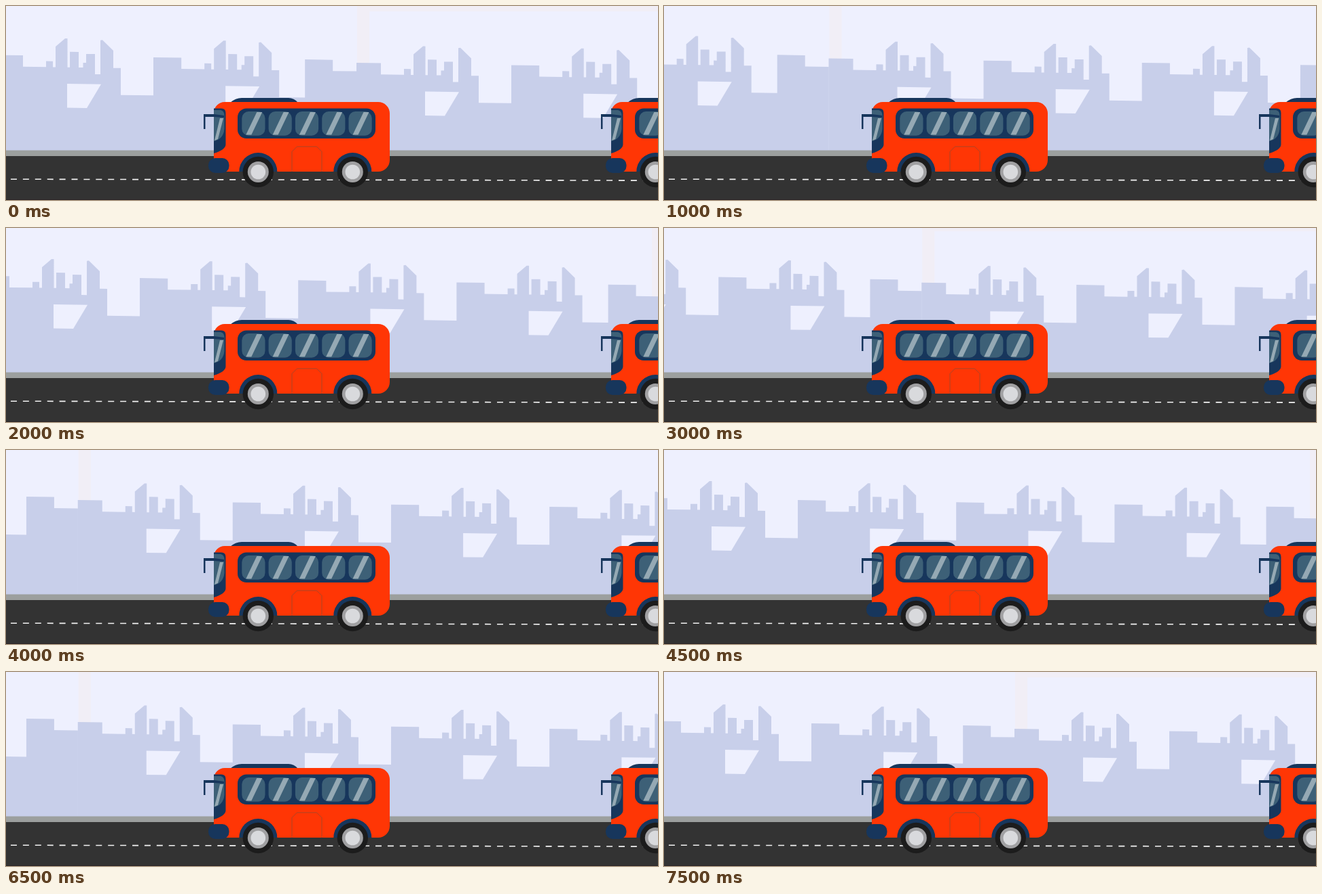
Write an HTML page with a canvas that moves like this. It is 960 px wide and 287 px high and loops after 8000 ms.

```html
<!DOCTYPE html>
<html lang="en">
<head>
<meta charset="utf-8">
<title>Bus in the city</title>
<style>
html, body { margin: 0; width: 100%; height: 100%; overflow: hidden; background: #eef0fe; }
canvas { display: block; }
</style>
</head>
<body>
<canvas id="stage" width="960" height="287"></canvas>
<script>
const ctx = document.getElementById('stage').getContext('2d');
const SKY = '#eef0fe', CITY = '#c8cfea', PINK = '#f1eef6';
const RED = '#ff3605', NAVY = '#17365c', GLASS = '#3d6077', GLARE = '#95a9b4';
const LOOP = 8000, HOLD = 500, POSES = 5;
const TILE = 233.2, SLOPE = 0.0139, BASE = -24.3, LOW = 15.6;

// Roofline of one block, relative to the top left corner of its opening.
const BLOCK = [
  [-65, BASE], [-31, BASE], [-31, -33], [-21, -33], [-21, BASE], [-17, BASE],
  [-17, -54.8], [-3, -67], [0.5, -67], [0.5, BASE], [4, BASE],
  [4, -47.2], [17, -47.2], [17, BASE], [23.5, BASE],
  [23.5, -31.3], [28, -31.3], [28, -44.5], [41, -44.5], [41, -14.6], [49, -14.6],
  [49, -65], [52, -65.5], [68, -50], [68, BASE], [79, BASE], [79, LOW]
];

function poly(points, color) {
  ctx.beginPath();
  points.forEach(([x, y]) => ctx.lineTo(x, y));
  ctx.closePath();
  ctx.fillStyle = color;
  ctx.fill();
}

function box(x, y, w, h, r, color) {
  ctx.beginPath();
  ctx.roundRect(x, y, w, h, r);
  ctx.fillStyle = color;
  ctx.fill();
}

function disc(x, y, r, color, start = 0) {
  ctx.beginPath();
  ctx.arc(x, y, r, start, Math.PI * 2);
  ctx.fillStyle = color;
  ctx.fill();
}

function shape(d, color) {
  ctx.fillStyle = color;
  ctx.fill(new Path2D(d));
}

// A run of blocks; its left end is cut at local x = from.
function strip(x, y, count, from) {
  ctx.save();
  ctx.transform(1, SLOPE, 0, 1, x, y);
  const roof = [[from, 160], [from, -41], [-65, -41]];
  let end = 0;
  for (let i = 0; i < count; i++) {
    const o = i * TILE;
    BLOCK.forEach(([px, py]) => roof.push([px + o, py]));
    const last = i === count - 1;
    const left = o + (last ? 117 : 127), right = o + (last ? 158 : TILE - 65);
    roof.push([left, LOW], [left, -40.8], [right, -40.8]);
    end = o + 193;
  }
  roof.push([end - 35, BASE], [end, BASE], [end, 160]);
  // Only the final block carries the short flat run before the cut.
  poly(roof, CITY);
  for (let i = 0; i < count; i++) {
    const o = i * TILE;
    poly([[o, 0], [o + 50, 0], [o + 29, 35.5], [o, 35.5]], SKY);
  }
  ctx.restore();
}

function city(pose) {
  const dx = -136.75 * pose, dy = -3.35 * pose;
  ctx.fillStyle = SKY;
  ctx.fillRect(0, 0, 960, 287);
  ctx.fillStyle = PINK;
  ctx.fillRect(517 + dx, 0, 18, 95);
  ctx.fillRect(517 + dx, 0, 981, Math.max(0, 8 + dy));
  ctx.fillRect(1498 + dx, 0, 18, 105);
  strip(90 + dx, 115 + dy, 2, -106);
  strip(617 + dx, 126.5 + dy, 4, -101);
}

function road() {
  ctx.fillStyle = '#9c9f9e';
  ctx.fillRect(0, 213.5, 960, 9);
  ctx.fillStyle = '#333333';
  ctx.fillRect(0, 222, 960, 65);
  ctx.fillStyle = '#2b2426';
  ctx.fillRect(0, 286, 960, 1);
  ctx.strokeStyle = '#f4f4f4';
  ctx.lineWidth = 1.6;
  ctx.setLineDash([9, 8.9]);
  ctx.beginPath();
  ctx.moveTo(7, 256.2);
  ctx.lineTo(960, 258.2);
  ctx.stroke();
  ctx.setLineDash([]);
}

function wheel(x) {
  disc(x, 245, 28, NAVY, Math.PI);
  disc(x, 245.5, 22.7, '#1c1c1c');
  disc(x, 245.5, 15.5, '#a0a0a2');
  disc(x, 245.5, 10.8, '#d9dadd');
}

function bus(x) {
  ctx.save();
  ctx.translate(x, 0);
  shape('M330 143Q338 136 347 136H416Q424 136 430 143Z', NAVY);
  box(306, 142, 259, 103, [16, 17, 17, 6], RED);

  // Windscreen and mirror
  shape('M306 151.5H317Q323.5 151.5 323.5 158V205Q323 213 306 218Z', NAVY);
  shape('M306 154H316Q321.5 155 321.5 162V182Q320 197 306 200Z', GLASS);
  poly([[315, 166], [320, 166], [312, 197], [307, 199]], GLARE);
  shape('M291 160H306L321 162V165L306 164H293.5V182H291Z', NAVY);
  box(298, 225, 30.5, 22, 10, NAVY);

  // Side windows
  box(341, 151.5, 203, 44.5, 13, NAVY);
  for (let i = 0; i < 5; i++) {
    const p = 347.3 + i * 39.3;
    box(p, 156, 34.2, 35.7, 10, GLASS);
    poly([[p + 22, 157], [p + 30, 157], [p + 14, 190.5], [p + 6, 190.5]], GLARE);
  }

  // Luggage door
  ctx.strokeStyle = '#a84427';
  ctx.lineWidth = 1;
  ctx.stroke(new Path2D('M421 245V215.5L428.5 208H457.5L465 215.5V245'));

  wheel(371.3);
  wheel(510.3);
  ctx.restore();
}

function frame(now) {
  const t = now % LOOP;
  // Poses run 0-4 and jump back to the first.
  city(Math.floor(t / HOLD) % POSES);
  road();
  bus(0);
  bus(585);
  requestAnimationFrame(frame);
}

const start = performance.now();
frame(0);
function tick() {
  return performance.now() - start;
}
</script>
</body>
</html>
```
